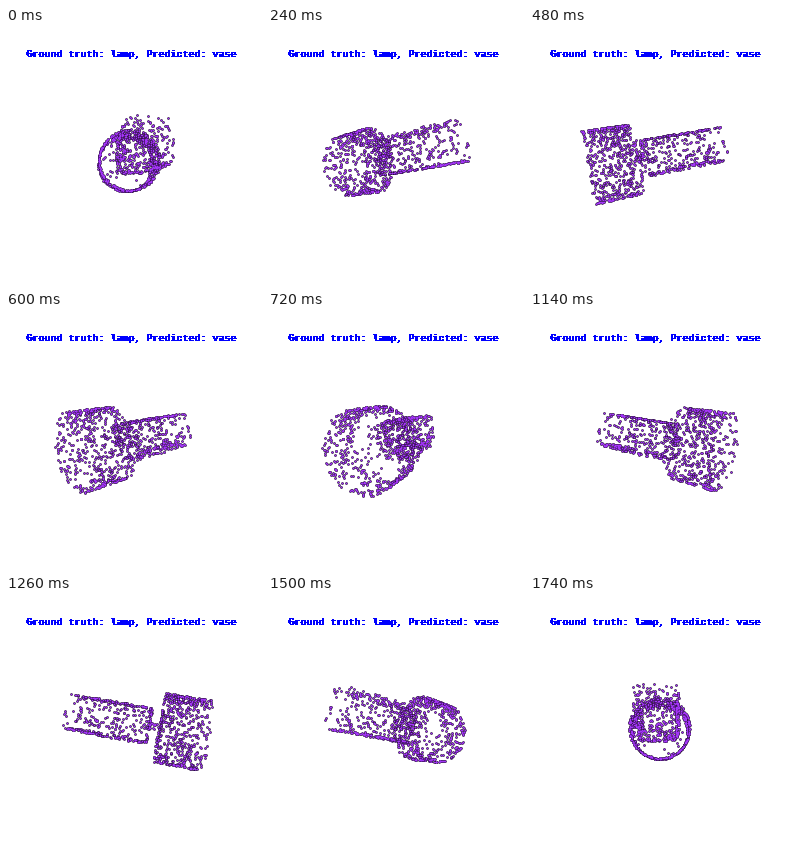
A matplotlib script that plays this animation: 256x256 px, repeating every 1800 ms.

```python
import numpy as np
import matplotlib.pyplot as plt
from matplotlib.animation import FuncAnimation

SIZE, DPI = 256, 64
PT = 72 / DPI              # points per pixel
FRAMES, INTERVAL = 30, 60
CAMERA = 245               # distance from the eye to the turning axis
TILT = np.radians(10)      # lean of the lamp's long axis
START = np.radians(10.2)
BANDS = 3                  # depth layers, each with its own dark rim
PURPLE = "#a436f8"

plt.rcParams.update({
    "text.hinting": "native",
    "text.hinting_factor": 1,
    "text.antialiased": False,
})
rng = np.random.default_rng(7)


def tube(n, start, end, radius):
    s = rng.uniform(start, end, n)
    a = rng.uniform(0, 2 * np.pi, n)
    return np.column_stack([s, radius * np.cos(a), radius * np.sin(a)])


def disk(n, s, radius):
    r = radius * np.sqrt(rng.random(n))
    a = rng.uniform(0, 2 * np.pi, n)
    return np.column_stack([np.full(n, s), r * np.cos(a), r * np.sin(a)])


def box(n, start, end, half):
    """Four long faces of a square duct."""
    s = rng.uniform(start, end, n)
    across = rng.uniform(-half, half, n)
    wall = half * rng.choice([-1, 1], n)
    upright = rng.random(n) < 0.5
    return np.column_stack([s, np.where(upright, wall, across),
                            np.where(upright, across, wall)])


def plate(n, s, half):
    return np.column_stack([np.full(n, s), rng.uniform(-half, half, (n, 2))])


def build():
    parts = np.vstack([
        tube(540, -69, -25.5, 34),
        disk(60, -25.5, 34),
        box(370, -14, 67, 17.3),
        plate(40, -14, 17.3),
        tube(14, -26, -14, 3),
    ])
    s, u, v = parts.T
    x = u
    y = 1.7 + s * np.sin(TILT) + v * np.cos(TILT)
    z = s * np.cos(TILT) - v * np.sin(TILT)
    return x, y, z


X, Y, Z = build()


def project(angle):
    """Screen positions after a turn about the vertical, far points first."""
    c, s = np.cos(angle), np.sin(angle)
    x, z = X * c + Z * s, Z * c - X * s
    scale = CAMERA / (CAMERA - z)
    pos = SIZE / 2 + np.column_stack([x, Y]) * scale[:, None]
    return (np.floor(pos) + 0.5)[np.argsort(z)]


fig = plt.figure(figsize=(SIZE / DPI, SIZE / DPI), dpi=DPI, facecolor="white")
ax = fig.add_axes([0, 0, 1, 1])
ax.set(xlim=(0, SIZE), ylim=(0, SIZE))
ax.axis("off")
for left in (20, 21):      # second strike thickens the stems
    ax.text(left, 227, "Ground truth: lamp, Predicted: vase", color="blue",
            family="Liberation Mono", weight="bold", size=10 * PT)


def dots(color, diameter, order):
    return ax.scatter([], [], s=(diameter * PT) ** 2, c=color,
                      linewidths=0, zorder=order)


layers = [(dots("black", 2.6, 2 * i), dots(PURPLE, 1.9, 2 * i + 1))
          for i in range(BANDS)]


def update(frame):
    points = project(START + 2 * np.pi * frame / FRAMES)
    for pair, band in zip(layers, np.array_split(points, BANDS)):
        for layer in pair:
            layer.set_offsets(band)
    return [layer for pair in layers for layer in pair]


anim = FuncAnimation(fig, update, frames=FRAMES, interval=INTERVAL,
                     repeat=True, repeat_delay=0)
plt.show()
```
